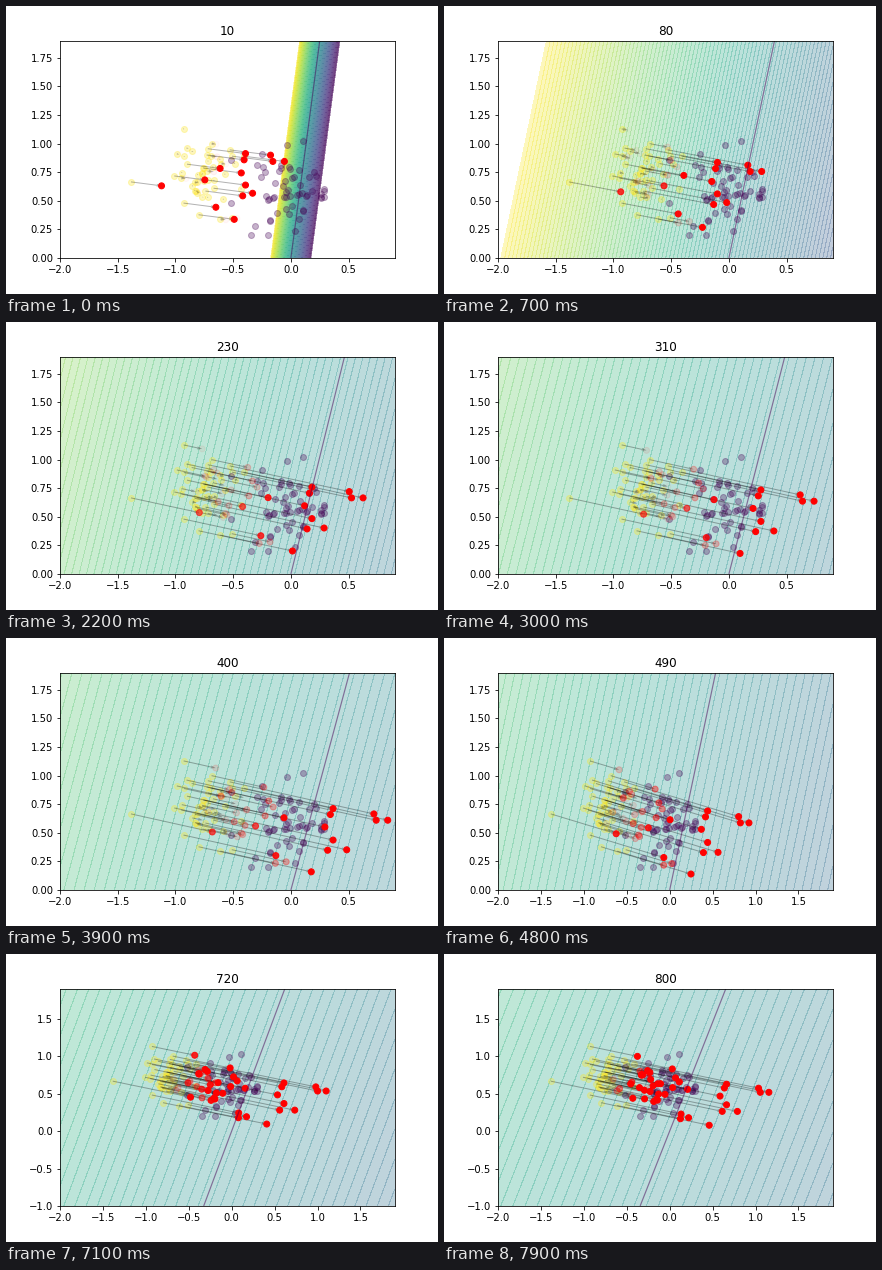
These frames come from a looping animation (432x288 px, 8000 ms). A matplotlib script:

```python
import numpy as np
import matplotlib.pyplot as plt
from matplotlib.animation import FuncAnimation

FRAMES = 80
WIDEN, DEEPEN = 45, 60          # steps at which the view grows in x and in y
PURPLE, YELLOW = "#440154", "#fde725"

rng = np.random.default_rng(4)


def cluster(count, center, sd, low, high):
    return np.clip(rng.normal(center, sd, (count, 2)), low, high)


# leaders cross the boundary early, stragglers follow slowly
leaders = np.array([
    (-.53, .945), (-.51, .89), (-.41, .89), (-.72, .955), (-.73, .90),
    (-.75, .785), (-.72, .68), (-.67, .61), (-.74, .585), (-.80, .378),
    (-1.385, .665), (-.90, .82), (-1.01, .717), (-.93, .48),
])
stragglers = cluster(34, (-.72, .70), (.14, .19), (-1, .34), (-.4, 1.2))
fixed = cluster(59, (-.04, .56), (.18, .19), (-.52, .2), (.29, 1.12))

starts = np.vstack([leaders, stragglers])
lead_total = .95 + .62 * np.clip((leaders[:, 0] + 1) / .4, 0, 1)
slow_total = rng.uniform(.05, .8, len(stragglers))
slow_power = 1.6 - np.clip((slow_total - .25) / .5, 0, 1)


def shifts(m):
    """Shift in x of every moving point after m steps."""
    base = .43 + .0062 * m - .176 * np.exp((1 - m) / 5)
    lead = base + (lead_total - .92) * (1 - .9 * np.exp(-m / 20))
    slow = slow_total * (m / FRAMES) ** slow_power
    return np.concatenate([lead, slow])


def tilt(m):
    return .226 + .0006 * m + .000011 * m**2 - .095 * np.exp((1 - m) / 5)


def spread(m):
    """Half width of the coloured band."""
    return 2 * (1 - np.exp(-(m / 7.5) ** 1.5)) + .08 * m


fig, ax = plt.subplots(figsize=(6, 4), dpi=72)
fig.subplots_adjust(left=.125, right=.9, bottom=.125, top=.88)


def draw(n):
    m = n + 1
    settle = np.exp((1 - m) / 5)
    x_hi = .9 if n < WIDEN else 1.9
    y_lo = 0 if n < DEEPEN else -1

    ax.clear()
    gx, gy = np.meshgrid(np.arange(-2, x_hi + .05, .1),
                         np.arange(y_lo, 1.95, .1))
    field = gx - tilt(m) * gy
    r = spread(m)
    ax.contourf(gx, gy, field, levels=np.linspace(-r, r, 120),
                cmap="viridis_r", alpha=.3)
    ax.contour(gx, gy, field, levels=[0], colors=PURPLE, alpha=.5,
               linewidths=1.2)

    x, y = starts.T
    dx = shifts(m)
    dy = -(.21 + .00036 * m - .08 * settle) * dx
    ax.scatter(x, y, color=YELLOW, alpha=.3)
    ax.scatter(*fixed.T, color=PURPLE, alpha=.3)
    ax.quiver(x, y, dx, dy, angles="xy", scale_units="xy", scale=1,
              width=.003, color="black", alpha=.3)

    # red grows solid with the distance covered
    full = .4 + .45 * np.sin(np.pi * m / FRAMES) - .15 * settle
    red = np.zeros((len(dx), 4))
    red[:, 0] = 1
    red[:, 3] = np.clip(dx / full, 0, 1) ** 2
    ax.scatter(x + dx, y + dy, color=red)

    ax.set_xlim(-2, x_hi)
    ax.set_ylim(y_lo, 1.9)
    ax.set_title(str(10 * m))
    return []


anim = FuncAnimation(fig, draw, frames=FRAMES, init_func=lambda: [],
                     interval=100, repeat=True, repeat_delay=0)
plt.show()
```
